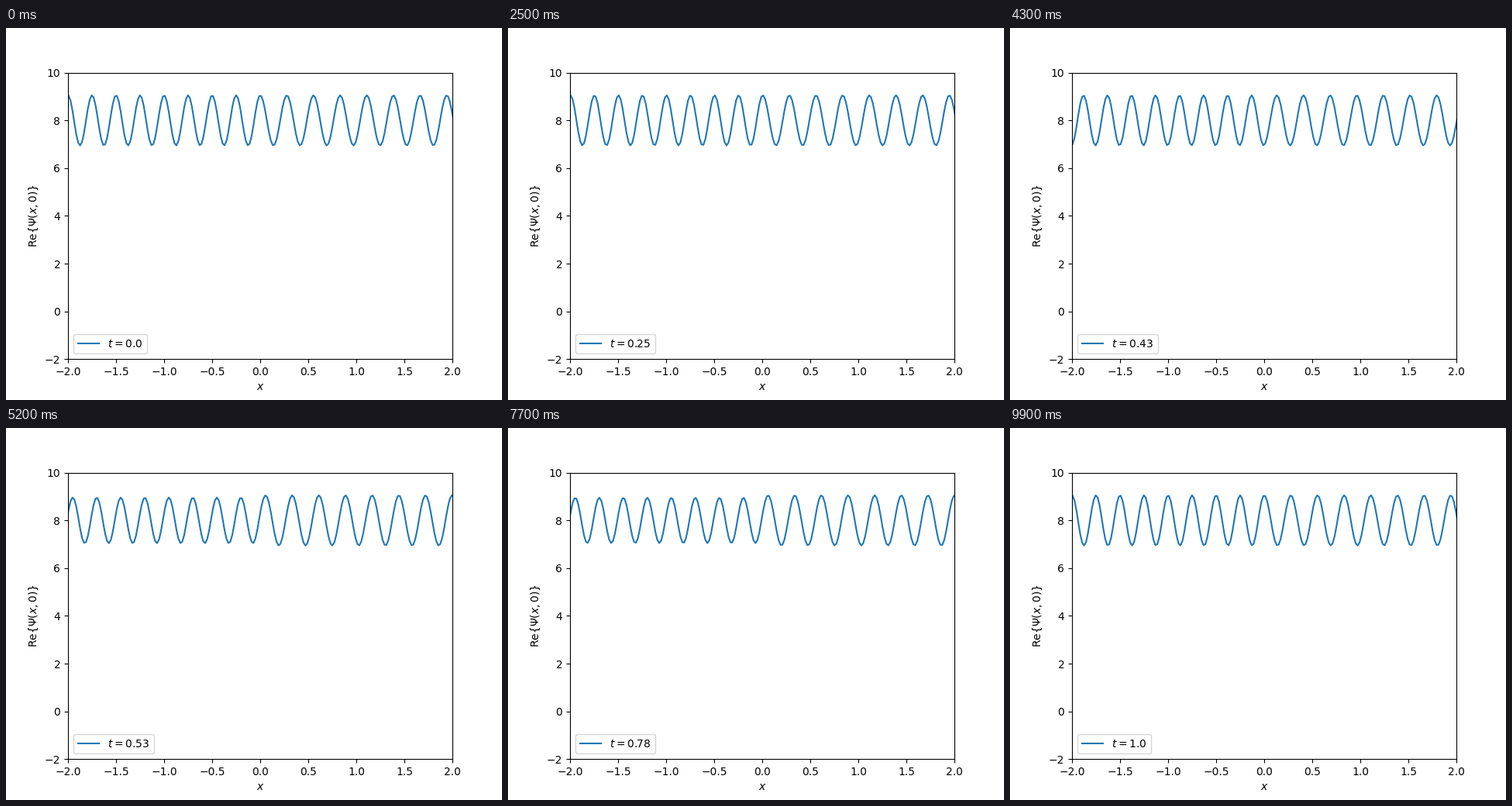
A matplotlib script that plays this animation: 640x480 px, repeating every 10 s.

```python
import numpy as np
import matplotlib.pyplot as plt
from matplotlib.animation import FuncAnimation

# Plane wave of energy E meeting a potential step of height V at x = 0 (h = m = 1)
E, V = 8.0, 1.5
HBAR = 1 / (2 * np.pi)
FRAMES, INTERVAL = 100, 100

k1 = np.sqrt(2 * E) / HBAR
k2 = np.sqrt(2 * (E - V)) / HBAR
reflect = (k1 - k2) / (k1 + k2)
transmit = 2 * k1 / (k1 + k2)

x = np.linspace(-5, 5, 500)
times = np.linspace(0, 1, FRAMES)
psi0 = np.where(
    x < 0,
    np.exp(1j * k1 * x) + reflect * np.exp(-1j * k1 * x),
    transmit * np.exp(1j * k2 * x),
)


def wave(t):
    return np.real(psi0 * np.exp(-1j * E * t / HBAR)) + E


def label(t):
    return f"$t={round(float(t), 2)}$"


fig, ax = plt.subplots(figsize=(6.4, 4.8), dpi=100)
line, = ax.plot(x, wave(0), label=label(0))
ax.set_xlim(-2, 2)
ax.set_ylim(-2, 10)
ax.set_xlabel("$x$")
ax.set_ylabel(r"Re$\{\Psi(x,0)\}$")
legend = ax.legend(loc="lower left")
caption = legend.get_texts()[0]


def update(i):
    t = times[i]
    line.set_ydata(wave(t))
    caption.set_text(label(t))
    return line, caption


anim = FuncAnimation(fig, update, frames=FRAMES, interval=INTERVAL,
                     repeat=True, repeat_delay=0)
plt.show()
```
